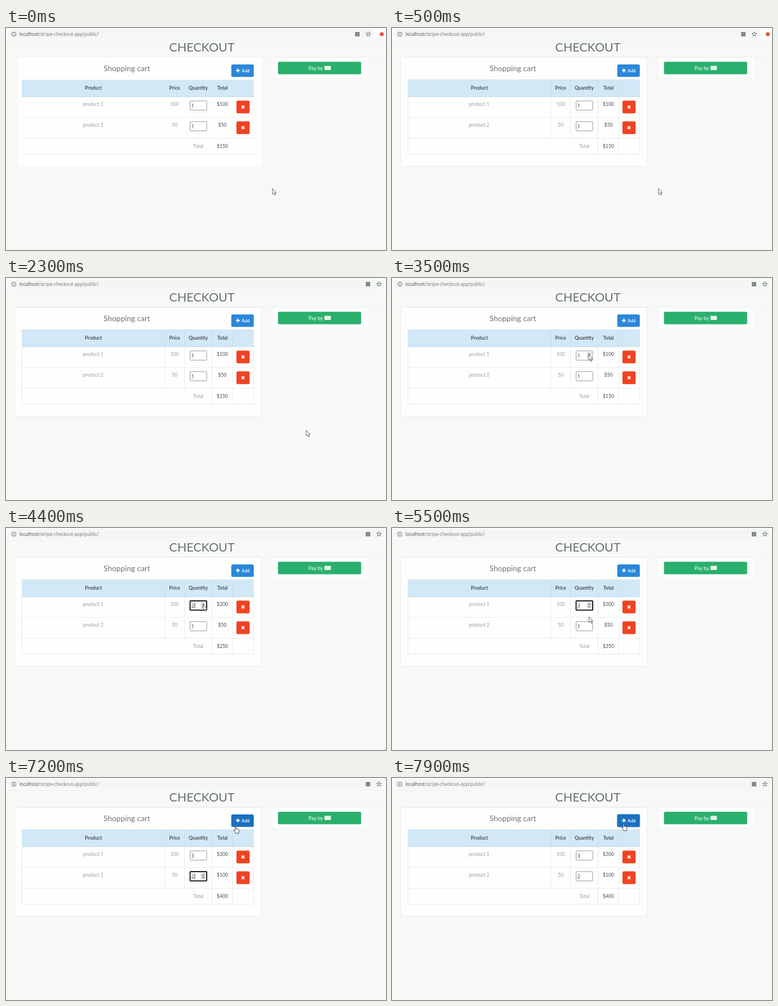
Write an HTML page that moves like this. It is 676 px wide and 396 px high and loops after 8 s.

```html
<!DOCTYPE html>
<html lang="en">
<head>
<meta charset="utf-8">
<title>Checkout</title>
<style>
  html, body { margin: 0; width: 100%; height: 100%; overflow: hidden; background: #f7f9f7; }
  svg { display: block; width: 676px; height: 396px; }
  text { font: 8.6px Lato, "Open Sans", sans-serif; fill: #9a9f9d; text-anchor: middle; }
  .url { font: 8.1px "Open Sans", sans-serif; fill: #707376; text-anchor: start; }
  .host { fill: #45484a; }
  .title { font-size: 21.5px; fill: #6a7171; }
  .sub { font-size: 13.7px; fill: #6e7474; }
  .head { font-weight: 700; fill: #4a5156; }
  .sum { fill: #484d4f; }
  .pay { font-size: 9px; fill: #fff; }
  .add { font: 8.4px "Liberation Serif", serif; fill: #fff; stroke: #fff; stroke-width: .2; }
  .qty { font: 8.6px "Open Sans", sans-serif; fill: #333; text-anchor: start; }
  .line { stroke: #e9edec; fill: none; }
  .icon { stroke: #6a6f72; fill: none; }
</style>
</head>
<body>
<svg viewBox="0 0 676 396">
  <rect width="676" height="396" fill="#f7f9f7"/>
  <rect width="676" height="21" fill="#fbfcfc"/>
  <rect id="bar" x="3" y="2" width="653" height="17" rx="8.5" fill="#f4f6f6"/>
  <path d="M0 21.5H676" stroke="#eceeed"/>
  <circle class="icon" cx="14" cy="11" r="3.8"/>
  <path class="icon" d="M14 10.3v2.9M14 8.5v1"/>
  <text class="url" x="24" y="14"><tspan class="host">localhost</tspan>/stripe-checkout-app/public/</text>
  <g id="tools">
    <rect x="621" y="7" width="8" height="8" fill="#85898b"/>
    <path id="star" class="icon" stroke-linejoin="round"/>
  </g>
  <circle id="badge" cx="668.5" cy="11" r="3.6" fill="#e8553f"/>

  <text class="title" x="348.5" y="42">CHECKOUT</text>
  <path d="M23 51.5H676" stroke="#f0f2f1"/>
  <rect x="22" y="52.5" width="432" height="194" fill="#fdfefd"/>
  <rect x="473" y="52.5" width="172" height="36.5" fill="#fcfdfc" stroke="#f3f5f4"/>
  <text class="sub" x="215" y="76.5">Shopping cart</text>

  <rect id="ring" x="399.7" y="63.7" width="42" height="24.6" rx="3" fill="#a9cdee"/>
  <rect id="addBtn" x="400.8" y="65" width="40" height="22.3" rx="2.5"/>
  <path d="M409 75.7h7M412.5 72.2v7" stroke="#fff" stroke-width="2"/>
  <text class="add" x="426" y="79">Add</text>
  <rect x="483.8" y="60.2" width="148" height="22.4" rx="2.5" fill="#29b06c"/>
  <text class="pay" x="551" y="74.5">Pay by</text>
  <rect x="566.5" y="67.5" width="11.5" height="7.5" rx=".8" fill="#e2f3e9"/>

  <g id="grid">
    <path class="line" fill-opacity="1" style="fill:#fdfefd" d="M22 52.5H15.5V246.5H22"/>
    <path class="line" d="M22 52.5H454V246.5H22"/>
    <path class="line" d="M28.5 122V225M283 122V196M317.5 122V196M366.5 122V225M403 122V225M440.5 122V225"/>
  </g>
  <rect x="28" y="92.5" width="413" height="30" fill="#d2e8f7"/>
  <path d="M28 122.5H441" stroke="#c3dae8"/>
  <path class="line" d="M28 159.5H441M28 196.5H441M28 225H441"/>
  <path id="headGrid" d="M28 92.5H441M283 93V122M317.5 93V122M366.5 93V122M403 93V122" stroke="#c6deed"/>
  <text class="head" x="155.5" y="110">Product</text>
  <text class="head" x="300" y="110">Price</text>
  <text class="head" x="342" y="110">Quantity</text>
  <text class="head" x="385" y="110">Total</text>
  <g id="rows"></g>
  <text x="342" y="213.5">Total</text>
  <text id="total" class="sum" x="385" y="213.5"></text>

  <g id="cursor">
    <path id="arrow" d="M0 0V10L2.3 8L4 11.8L5.7 11L4.1 7.4H7Z" fill="#fff" stroke="#555" stroke-width=".9"/>
    <path id="hand" d="M-1 .8Q0-.8 1 .8V4.6L5 5.3Q6.3 5.7 6.2 7L5.5 10V12.3H-.2V10.8L-3.5 7.2Q-3.4 5.6-1 7.2Z" fill="#fff" stroke="#333" stroke-width=".9"/>
  </g>
</svg>
<script>
const LOOP = 8000, STEP = 100;
const $ = id => document.getElementById(id);
const show = (el, on) => el.setAttribute('visibility', on ? 'visible' : 'hidden');

// time, x, y of the pointer tip
const track = [
  [0, 474, 286.3], [900, 474, 286.3], [1200, 522, 271.5], [1700, 534, 271.5], [2300, 534, 271.5],
  [2800, 405, 180], [3300, 350, 137], [3600, 350, 137], [3900, 351, 137], [5200, 351, 137],
  [5700, 350, 170], [6600, 350, 170], [7300, 412, 81.5], [LOOP, 412, 81.5]
];
// time, row of each quantity click
const clicks = [[4100, 0], [4900, 0], [6200, 1]];
const BLUR = 7900;

const star = [...Array(10)].map((_, i) => {
  const r = i % 2 ? 1.8 : 4.4, a = i * Math.PI / 5;
  return `${644.5 + r * Math.sin(a)} ${11 - r * Math.cos(a)}`;
});
$('star').setAttribute('d', `M${star.join('L')}Z`);

const rows = [100, 50].map((price, i) => {
  const g = document.createElementNS('http://www.w3.org/2000/svg', 'g');
  g.setAttribute('transform', `translate(0 ${i * 37})`);
  g.innerHTML = `
    <text x="155" y="139.3">product ${i + 1}</text>
    <text x="300" y="139.3">${price}</text>
    <rect class="box" x="327.5" y="130" width="29.5" height="16.5" rx="1" fill="#fff"/>
    <text class="qty" x="329.8" y="141.7"></text>
    <path class="caret" d="M335.8 133.5V143.5" stroke="#222" stroke-width=".9"/>
    <g class="spin">
      <rect x="346.5" y="132" width="8.5" height="12" fill="#dcdede"/>
      <path d="M348.8 136.7l2-2.4 2 2.4zM348.8 139.6l2 2.4 2-2.4z" fill="#606364"/>
    </g>
    <text class="sum" x="385" y="139.3"></text>
    <rect x="410" y="129.5" width="23.4" height="22.7" rx="2.5" fill="#f04323"/>
    <path d="M419.2 138.5l4.8 4.8m0-4.8l-4.8 4.8" stroke="#fff" stroke-width="1.9"/>`;
  $('rows').append(g);
  const part = name => g.querySelector('.' + name);
  return { price, box: part('box'), qty: part('qty'), caret: part('caret'), spin: part('spin'), sum: part('sum') };
});

function pointer(t) {
  const i = track.findIndex(p => p[0] > t);
  const [t0, x0, y0] = track[i - 1], [t1, x1, y1] = track[i];
  const k = (t - t0) / (t1 - t0), e = k * k * (3 - 2 * k);
  return [x0 + (x1 - x0) * e, y0 + (y1 - y0) * e];
}

function draw(t) {
  const [x, y] = pointer(t);
  const done = clicks.filter(c => c[0] <= t);
  const last = t < BLUR ? done[done.length - 1] : null;
  let total = 0;

  rows.forEach((row, i) => {
    const qty = 1 + done.filter(c => c[1] === i).length;
    const focus = !!last && last[1] === i;
    const top = 130 + i * 37;
    const hover = x > 327 && x < 357 && y > top && y < top + 17;
    total += qty * row.price;
    row.qty.textContent = qty;
    row.sum.textContent = '$' + qty * row.price;
    row.box.setAttribute('stroke', focus ? '#1c1f20' : '#969b9b');
    row.box.setAttribute('stroke-width', focus ? 2 : 1);
    show(row.caret, focus && (t - last[0]) % 1000 < 500);
    show(row.spin, focus || hover);
  });
  $('total').textContent = '$' + total;

  const onAdd = x > 401 && x < 441 && y > 65 && y < 87;
  $('addBtn').setAttribute('fill', onAdd ? '#1b70c0' : '#2b87da');
  show($('ring'), t >= BLUR);
  show($('arrow'), !onAdd);
  show($('hand'), onAdd);
  $('cursor').setAttribute('transform', `translate(${x} ${y})`);

  const wide = t >= 2000;
  $('bar').setAttribute('width', wide ? 671 : 653);
  $('tools').setAttribute('transform', `translate(${wide ? 19 : 0} 0)`);
  show($('badge'), !wide);
  show($('grid'), t >= 500);
  show($('headGrid'), t >= 500);
}

const start = performance.now();
function tick() {
  const t = (performance.now() - start) % LOOP;
  draw(Math.floor(t / STEP) * STEP);
  requestAnimationFrame(tick);
}
tick();
</script>
</body>
</html>
```
